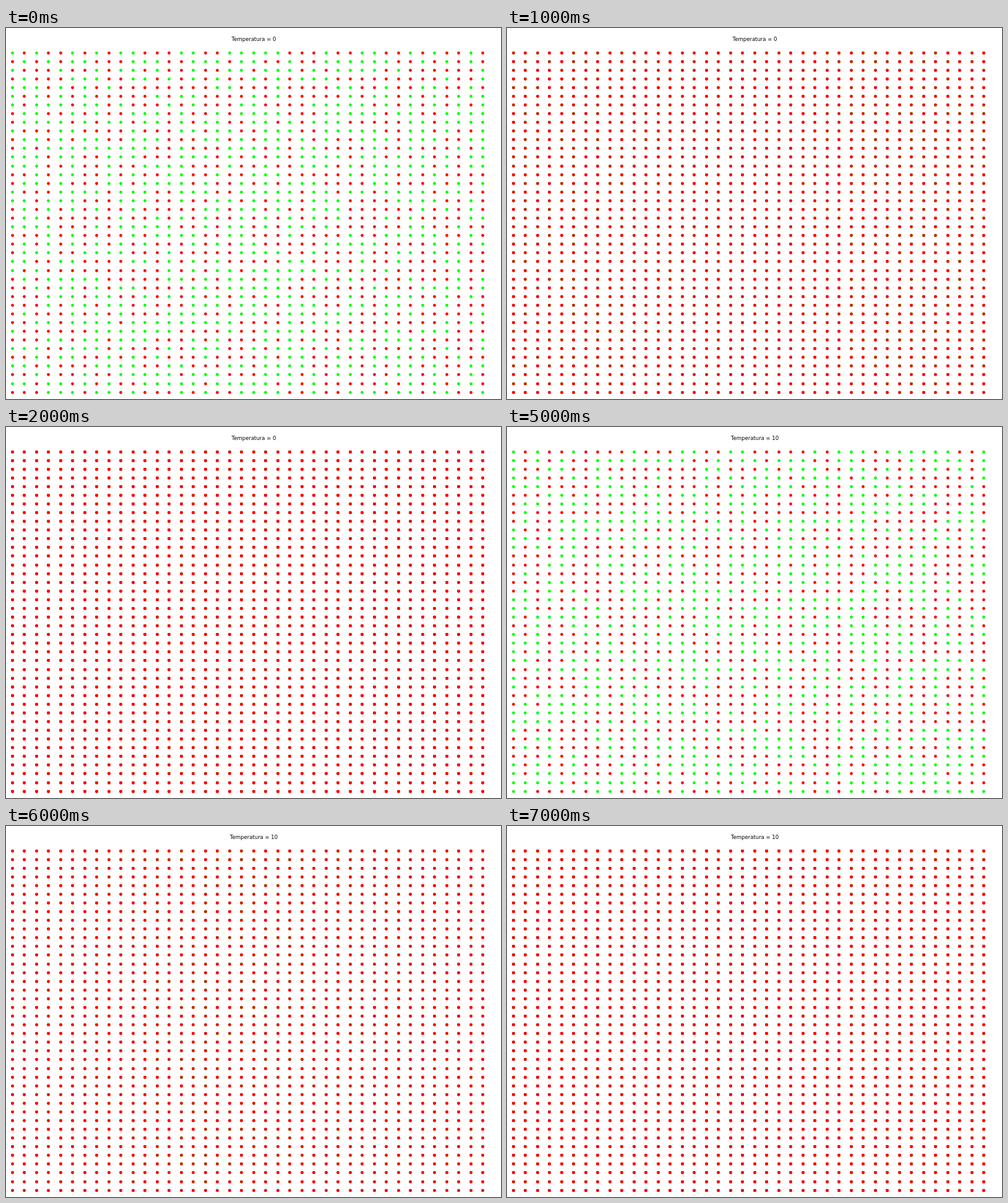
An HTML page with a canvas for the animation above (8 s loop, 800x600 px).

```html
<!DOCTYPE html>
<html lang="it">
<head>
<meta charset="utf-8">
<style>
  html, body { margin: 0; width: 100%; height: 100%; overflow: hidden; background: #fff; }
  canvas { display: block; }
</style>
</head>
<body>
<canvas id="stage" width="800" height="600"></canvas>
<script>
const ctx = document.getElementById("stage").getContext("2d");
const SIZE = 40, LOOP = 8000, STEP = 1000, RADIUS = 2.4;
const RED = "#ff0000", GREEN = "#00ff00";
const PHASES = [
  { start: 0, temperature: 0, seed: 17 },
  { start: 5, temperature: 10, seed: 91 }
];

function randomSource(seed) {
  return () => {
    seed = (seed + 0x6d2b79f5) | 0;
    let n = Math.imul(seed ^ (seed >>> 15), 1 | seed);
    n = (n + Math.imul(n ^ (n >>> 7), 61 | n)) ^ n;
    return ((n ^ (n >>> 14)) >>> 0) / 4294967296;
  };
}

function drawSpins(colorOf) {
  for (let row = 0; row < SIZE; row++) {
    for (let col = 0; col < SIZE; col++) {
      const x = Math.round(10 + 19.487 * col) + 0.5;
      const y = Math.floor(40 + 14.08 * row) + 0.5;
      ctx.fillStyle = colorOf();
      ctx.beginPath();
      ctx.arc(x, y, RADIUS, 0, Math.PI * 2);
      ctx.fill();
    }
  }
}

function draw(step) {
  const phase = PHASES[step < PHASES[1].start ? 0 : 1];
  ctx.fillStyle = "#fff";
  ctx.fillRect(0, 0, 800, 600);

  const random = randomSource(phase.seed);
  drawSpins(() => random() < 0.52 ? RED : GREEN);

  // Aligned spins are painted over the earlier ones, so soft edges build up.
  const layers = Math.min(2, step - phase.start);
  for (let i = 0; i < layers; i++) drawSpins(() => RED);

  ctx.fillStyle = "#000";
  ctx.font = '8.5px "DejaVu Sans", sans-serif';
  ctx.textAlign = "center";
  ctx.fillText("Temperatura = " + phase.temperature, 400.5, 21);
}

let shown = -1;
function tick() {
  const step = Math.floor((performance.now() % LOOP) / STEP);
  if (step !== shown) draw(shown = step);
  requestAnimationFrame(tick);
}
tick();
</script>
</body>
</html>
```
